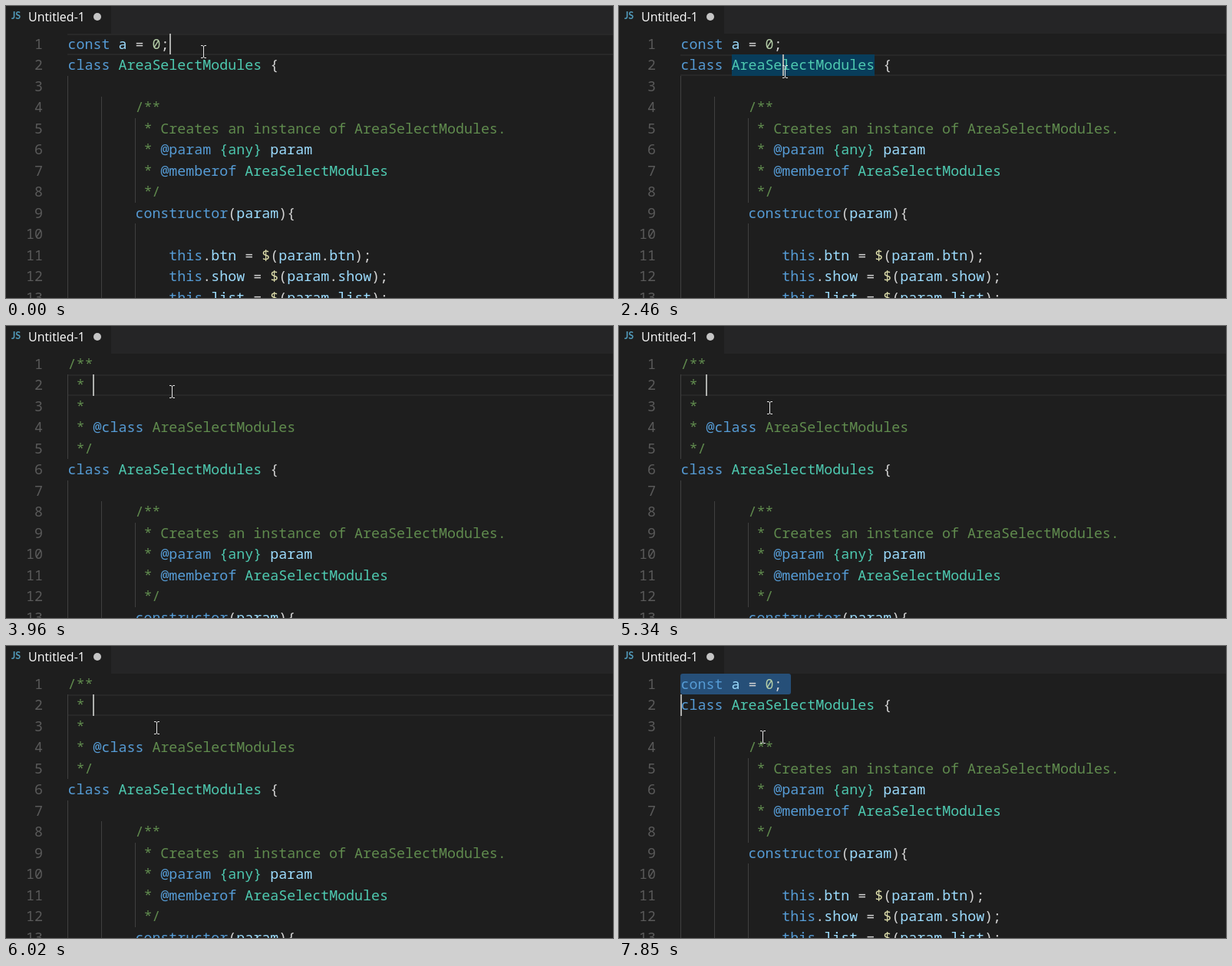
Animation of 791 by 380 pixels, one loop 8 s. Source, as an HTML page:

```html
<!DOCTYPE html>
<html lang="en">
<head>
<meta charset="utf-8">
<title>Code editor</title>
<style>
html, body { margin: 0; width: 100%; height: 100%; overflow: hidden; background: #1e1e1e; }
body { position: relative; }
div, svg, i { position: absolute; }

#tabs { inset: 0 0 auto; height: 36px; background: #252526; }
#tab { width: 137px; height: 36px; background: #1e1e1e; }
#icon { left: 7px; top: 4px; font: 700 12.5px/17px Lato, sans-serif; color: #519aba; }
#name { left: 29px; top: 3px; font: 500 16px/22px "Open Sans", "Noto Sans", sans-serif; color: #fff; white-space: pre; }
#dot { left: 114px; top: 9px; width: 10px; height: 10px; border-radius: 50%; background: #c5c5c5; }

#editor { inset: 36px 0 0; overflow: hidden; }
#editor > *, #mouse, #mouse > *, #a .type { animation: 8s step-end infinite; }
#a, #b { inset: 0; }
.line { left: 0; width: 100%; font: 500 18.327px/25px "Noto Sans Mono", "DejaVu Sans Mono", monospace; color: #d4d4d4; white-space: pre; font-variant-ligatures: none; }
.line .num { left: 0; width: 48px; text-align: right; font-weight: 400; color: #5a5a5a; }
.line .text { left: 80.5px; }
.line i { width: 1px; top: 0; height: 100%; background: #404040; }
.key { color: #569cd6; }
.type { color: #4ec9b0; }
.var { color: #9cdcfe; }
.numb { color: #b5cea8; }
.str { color: #ce9178; }
.fn { color: #dcdcaa; }
.doc { color: #608b4e; }

#current { left: 80px; right: 0; height: 28px; box-sizing: border-box; border: solid #282828; border-width: 2px 0; }
#word { left: 147px; top: 27px; width: 186px; height: 28px; background: #083d5b; }
#range { left: 80px; top: 0; width: 144px; height: 27px; border-radius: 3px; background: #264f78; }
#caret { width: 2px; background: #aeafad; }
#mouse { left: 0; top: 0; width: 0; height: 0; }
#beam { left: -4px; top: -8px; }
#hand { left: -6px; top: 0; }

#editor > #a { animation-name: before; }
#editor > #b { animation-name: after; }
#editor > #current { animation-name: current; }
#editor > #word { animation-name: word; }
#editor > #range { animation-name: range; }
#editor > #caret { animation-name: caret; }
#mouse { animation-name: move; }
#mouse > #beam { animation-name: beam; }
#mouse > #hand { animation-name: hand; }
#a .line:nth-child(2) .type { animation-name: link; }

@keyframes before { 0%, 97.375% { opacity: 1 } 49.5% { opacity: 0 } }
@keyframes after {
  0%, 97.375% { opacity: 0; transform: none }
  49.5% { opacity: 1; transform: none }
  70.25% { opacity: 1; transform: translateY(-233px) }
  74.875% { opacity: 1; transform: translateY(-116px) }
  75.25% { opacity: 1; transform: none }
}
@keyframes current {
  0% { top: 0; opacity: 1 }
  27.75%, 75.25% { top: 27px; opacity: 1 }
  70.25%, 97.375% { top: 27px; opacity: 0 }
}
@keyframes word { 0%, 49.5% { opacity: 0 } 30.75% { opacity: 1 } }
@keyframes range { 0% { opacity: 0 } 98.125% { opacity: 1 } }
@keyframes caret {
  0%, 9.25%, 21.75% { left: 213px; top: 0; height: 27px; opacity: 1 }
  3.125%, 15.5% { left: 213px; top: 0; height: 27px; opacity: 0 }
  27.75%, 40.375% { left: 213px; top: 27px; height: 28px; opacity: 1 }
  33.875%, 46% { left: 213px; top: 27px; height: 28px; opacity: 0 }
  49.5%, 61.125%, 75.25%, 85.5% { left: 113px; top: 27px; height: 28px; opacity: 1 }
  55.25%, 67.5%, 79.875%, 92% { left: 113px; top: 27px; height: 28px; opacity: 0 }
  98.125% { left: 80px; top: 27px; height: 28px; opacity: 1 }
}
@keyframes link {
  0%, 43.375% { color: #4ec9b0; text-decoration-line: none }
  38.125% { color: #4e94ce; text-decoration-line: underline }
}
@keyframes beam { 0%, 43.375% { opacity: 1 } 38.125% { opacity: 0 } }
@keyframes hand { 0%, 43.375% { opacity: 0 } 38.125% { opacity: 1 } }
@keyframes move {
  0% { transform: translate(257px, 59px) }
  21.25% { transform: translate(265px, 62px) }
  22.125% { transform: translate(260px, 70px) }
  23% { transform: translate(243px, 79px) }
  23.75% { transform: translate(226px, 84px) }
  24.625% { transform: translate(216px, 85px) }
  60.375% { transform: translate(205px, 108px) }
  61.125% { transform: translate(193px, 121px) }
  61.75% { transform: translate(195px, 107px) }
  66.75% { transform: translate(196px, 106px) }
  81.875% { transform: translate(206px, 112px) }
  82.375% { transform: translate(197px, 121px) }
  82.875% { transform: translate(187px, 118px) }
}
</style>
</head>
<body>
<div id="tabs">
  <div id="tab"></div>
  <div id="icon">JS</div>
  <div id="name">Untitled-1</div>
  <div id="dot"></div>
</div>
<div id="editor">
  <div id="current"></div>
  <div id="word"></div>
  <div id="range"></div>
  <div id="a"></div>
  <div id="b"></div>
  <div id="caret"></div>
</div>
<div id="mouse">
  <svg id="beam" width="9" height="17" fill="none">
    <path d="M1 .5h2l1.5 1 1.5-1h2M4.5 1.5v14M1 16.5h2l1.5-1 1.5 1h2" stroke="#e4e4e4"/>
  </svg>
  <svg id="hand" width="18" height="22">
    <path d="M5 14V2q0-1.5 1.5-1.5T8 2v5q2.5-1 3 1 2.5-1 3 1 2.5-.5 2.5 2v4q0 3-2 4.5v2H7v-2L1 13q-1-2 1-2.5 1.5 0 3 3" fill="#fff" stroke="#000"/>
  </svg>
</div>
<script>
const tail = `class AreaSelectModules {
    
        /**
         * Creates an instance of AreaSelectModules.
         * @param {any} param
         * @memberof AreaSelectModules
         */
        constructor(param){
            
            this.btn = $(param.btn);
            this.show = $(param.show);
            this.list = $(param.list);
            
            this.callback = param.callback;
            
            this.code = "86";`;
const docs = {
  a: 'const a = 0;\n' + tail,
  b: '/**\n * \n * \n * @class AreaSelectModules\n */\n' + tail,
};

const tag = (cls, s) => `<span class="${cls}">${s}</span>`;
const rowTop = n => Math.floor(27.5 * n);

function codeClass(s) {
  if (/^(const|class|constructor|this)$/.test(s)) return 'key';
  if (s[0] === '"') return 'str';
  if (s === '$') return 'fn';
  if (/^\d/.test(s)) return 'numb';
  return /^[A-Z]/.test(s) ? 'type' : 'var';
}

function docClass(s) {
  return s[0] === '@' ? 'key' : s === 'param' ? 'var' : 'type';
}

function paint(s) {
  if (/^\s*[/*]/.test(s)) {
    const rule = /@\w+|\{any\}|(?<=\} )param|(?<=@memberof )\w+/g;
    return tag('doc', s.replace(rule, w => tag(docClass(w), w)));
  }
  return s.replace(/"[^"]*"|\$|\w+/g, w => tag(codeClass(w), w));
}

function row(s, n) {
  const depth = Math.ceil(s.match(/^ */)[0].length / 4);
  const guides = Array.from({ length: depth }, (_, k) => `<i style="left:${80 + 44 * k}px"></i>`).join('');
  const top = rowTop(n);
  return `<div class="line" style="top:${top}px;height:${rowTop(n + 1) - top}px">` +
    `${guides}<div class="num">${n + 1}</div><div class="text">${paint(s)}</div></div>`;
}

for (const id in docs) {
  document.getElementById(id).innerHTML = docs[id].split('\n').map(row).join('');
}
</script>
</body>
</html>
```
